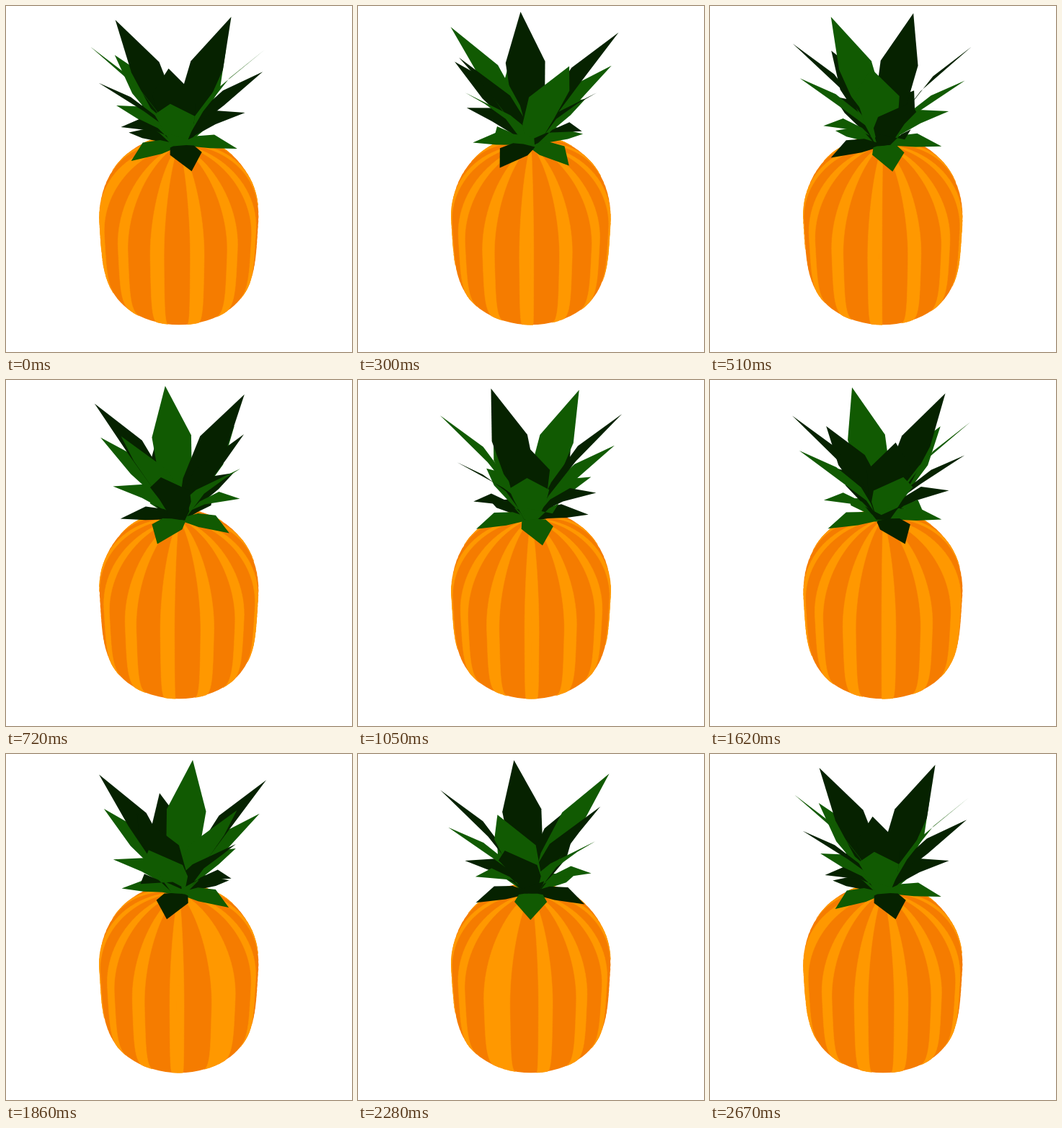
An HTML page with a canvas for the animation above (2.7 s loop, 480 px wide and 480 px high).

```html
<!DOCTYPE html>
<html lang="en">
<head>
<meta charset="utf-8">
<title>Turning pineapple</title>
<style>
  html, body { margin: 0; width: 100%; height: 100%; overflow: hidden; background: #fff; }
  canvas { display: block; width: 480px; height: 480px; }
</style>
</head>
<body>
<canvas id="stage" width="480" height="480"></canvas>
<script>
const ctx = document.getElementById('stage').getContext('2d');
const RAD = Math.PI / 180;
const TILT = 29 * RAD, DIST = 1000;
const LIGHT = '#115a02', DARK = '#062200', STEM = '#34400a';
const ORANGE = '#f57c00', AMBER = '#ff9800';

// Camera looks down on the origin; x right, y up, z towards the viewer.
function project(x, y, z) {
  const up = y * Math.cos(TILT) - z * Math.sin(TILT);
  const near = y * Math.sin(TILT) + z * Math.cos(TILT);
  const s = DIST / (DIST - near);
  return [240 + x * s, 240 - up * s];
}

// Point at azimuth a (0 faces the viewer), pushed sideways by `side`.
function polar(a, r, y, side = 0) {
  const sin = Math.sin(a), cos = Math.cos(a);
  return project(r * sin + side * cos, y, r * cos - side * sin);
}

function trace(path, points) {
  points.forEach(([x, y], i) => i ? path.lineTo(x, y) : path.moveTo(x, y));
  path.closePath();
}

function fillPoly(points, color) {
  ctx.beginPath();
  trace(ctx, points);
  ctx.fillStyle = color;
  ctx.fill();
}

// Body: a lathe with a squarer lower half.
const BODY = { r: 113, mid: -62, top: 116, bottom: 135 };
const ROWS = 48;
const profile = Array.from({ length: ROWS + 1 }, (_, i) => {
  const v = Math.sin((i / ROWS - 0.5) * Math.PI);
  const p = v < 0 ? 4.4 : 2.1;
  return {
    r: BODY.r * Math.pow(1 - Math.pow(Math.abs(v), p), 1 / p),
    y: BODY.mid + v * (v < 0 ? BODY.bottom : BODY.top)
  };
});

const bodyShape = new Path2D();
for (const { r, y } of profile) {
  trace(bodyShape, Array.from({ length: 60 }, (_, i) => polar(i * 6 * RAD, r, y)));
}

// Twelve even stripes and one wide stripe at the seam.
const stripes = Array.from({ length: 12 }, (_, i) => ({ at: -43.9 + 26.7 * i, half: 4.7 }));
stripes.push({ at: 282.9, half: 9.6 });

function drawBody(turn) {
  ctx.fillStyle = ORANGE;
  ctx.fill(bodyShape);
  ctx.beginPath();
  for (const { at, half } of stripes) {
    const cuts = 4;
    for (let c = 0; c < cuts; c++) {
      const a0 = (at - half + 2 * half * c / cuts - turn) * RAD;
      const a1 = a0 + 2 * half / cuts * RAD;
      for (let i = 0; i < ROWS; i++) {
        const lo = profile[i], hi = profile[i + 1];
        const q = [polar(a0, lo.r, lo.y), polar(a1, lo.r, lo.y),
                   polar(a1, hi.r, hi.y), polar(a0, hi.r, hi.y)];
        const cross = (q[2][0] - q[0][0]) * (q[3][1] - q[1][1])
                    - (q[2][1] - q[0][1]) * (q[3][0] - q[1][0]);
        if (cross < 0) trace(ctx, q);
      }
    }
  }
  ctx.fillStyle = ctx.strokeStyle = AMBER;
  ctx.lineWidth = 0.5;
  ctx.fill();
  ctx.stroke();
}

// Crown tiers from top to bottom. Blade stations are [radius, height, half width];
// light and dark list the azimuths of the leaves.
const tiers = [
  { tip: [113, 203], outer: [59, 149, 27], inner: [25, 98, 22], weight: 1,
    light: [287, 61.5], dark: [138.5, 226.5, 351.5] },
  { tip: [107, 158], outer: [58, 122, 25], inner: [26, 92, 21], weight: 1.25,
    light: [140, 232, 352], dark: [86, 290] },
  { tip: [87, 101], outer: [48, 94, 22], inner: [22, 76, 18], weight: 1.6,
    light: [8, 160, 253], dark: [86, 218, 300] },
  { tip: [79, 54], outer: [45, 62, 21], inner: [20, 60, 16], weight: 2.1,
    light: [77, 153, 306], dark: [9, 240] }
];
const leaves = tiers.flatMap(tier => [
  ...tier.light.map(at => ({ tier, at, color: LIGHT })),
  ...tier.dark.map(at => ({ tier, at, color: DARK }))
]);

function drawLeaf({ tier, at, color }, turn) {
  const a = (at - turn) * RAD;
  const rows = [[5, 54, 9], tier.inner, tier.outer];
  const edge = dir => rows.map(([r, y, half]) => polar(a, r, y, dir * half));
  fillPoly([...edge(-1), polar(a, ...tier.tip), ...edge(1).reverse()], color);
}

function drawCrown(turn) {
  const depth = l => Math.cos((l.at - turn) * RAD) * l.tier.weight;
  const sorted = [...leaves].sort((p, q) => depth(p) - depth(q));
  const split = sorted.findIndex(l => depth(l) > 0);
  sorted.slice(0, split).forEach(l => drawLeaf(l, turn));
  fillPoly([project(-8, 46, 0), project(-6, 88, 0), project(6, 88, 0), project(8, 46, 0)], STEM);
  sorted.slice(split).forEach(l => drawLeaf(l, turn));
}

// 90 steps of 30 ms; the last pose equals the first. The turn slows slightly.
const start = performance.now();
function frame() {
  const p = Math.floor((performance.now() - start) / 30) % 90 / 89;
  const turn = 360 * p + 3.7 * Math.sin(Math.PI * p) - 2.6;
  ctx.clearRect(0, 0, 480, 480);
  drawBody(turn);
  drawCrown(turn);
  requestAnimationFrame(frame);
}
frame();
</script>
</body>
</html>
```
